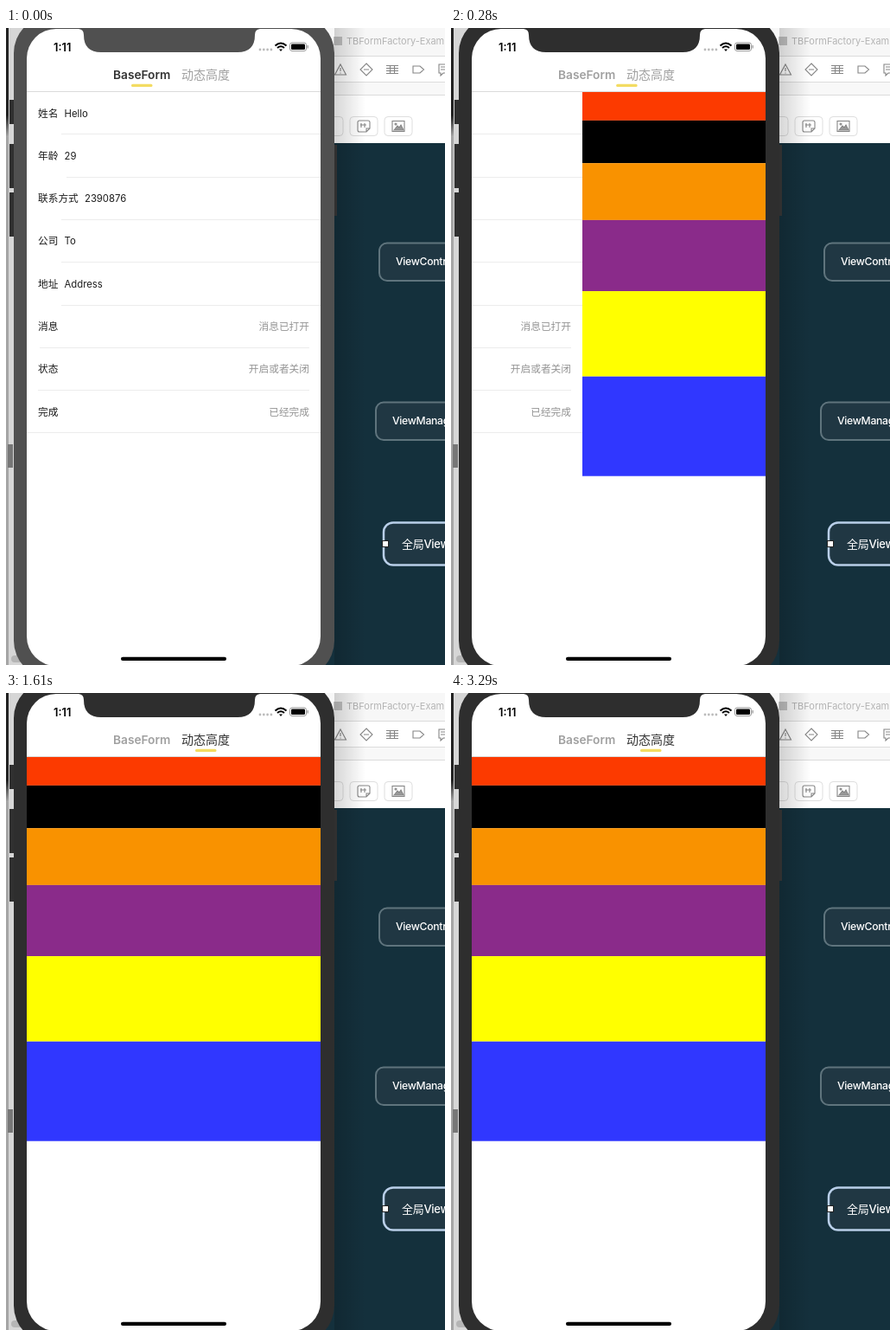
An HTML page that plays this animation: 508 px wide and 736 px high, repeating every 3.36 s.

```html
<!DOCTYPE html>
<html lang="zh">
<head>
<meta charset="utf-8">
<style>
html, body { margin: 0; width: 100%; height: 100%; overflow: hidden; background: #fff; }
svg { display: block; width: 508px; height: 736px; }
text { font-family: Inter, "Noto Sans CJK SC", "Noto Sans CJK", sans-serif; }
.row { font-size: 11.7px; fill: #1c1c1c; }
.value { font-size: 11.3px; }
.status { fill: #949494; text-anchor: end; }
.tab { font-size: 13.7px; font-weight: 600; }
.cjk { font-size: 14px; font-weight: 500; }
.node text { font-size: 12.2px; font-weight: 500; letter-spacing: -.3px; fill: #fff; }
.node rect { fill: #203743; stroke: #5f747d; stroke-width: 2; }
.icon { fill: none; stroke: #858585; stroke-width: 1.1; }
.button { fill: #fff; stroke: #dedede; }
</style>
</head>
<body>
<svg viewBox="0 0 508 736">
  <defs>
    <clipPath id="view"><rect x="24" y="74" width="340" height="640"/></clipPath>
    <linearGradient id="shade">
      <stop stop-opacity=".16"/><stop offset="1" stop-opacity="0"/>
    </linearGradient>
    <linearGradient id="edge" x2="0" y2="1">
      <stop stop-color="#222"/><stop offset=".8" stop-color="#222"/><stop offset="1" stop-color="#aaa"/>
    </linearGradient>
  </defs>

  <!-- editor window behind the phone -->
  <rect width="508" height="736" fill="#d6d6d6"/>
  <rect width="3" height="736" fill="#a5a5a5"/>
  <rect width="3" height="126" fill="url(#edge)"/>
  <rect x="2" y="481" width="6" height="27" fill="#777"/>
  <rect x="6" y="725" width="20" height="8" rx="4" fill="#b5b5b5"/>
  <rect x="340" width="168" height="133" fill="#fff"/>
  <rect x="340" width="168" height="32" fill="#f7f7f7"/>
  <rect x="340" y="63" width="168" height="15" fill="#f8f8f8"/>
  <path d="M340 32.5H508M340 62.5H508M340 77.5H508" stroke="#dcdcdc"/>
  <rect x="379" y="10" width="10" height="10" fill="#c2c2c2"/>
  <text x="394" y="19" font-size="11" fill="#b4b4b4">TBFormFactory-Example</text>
  <g class="icon">
    <path d="M387 42L393.500 54H380.500ZM387 46V50M387 51.500V52.500"/>
    <path d="M417 41L424 48L417 55L410 48ZM414 48H420"/>
    <path d="M440 43.500H454M440 46.500H454M440 49.500H454M440 52.500H454M444.500 43V53M449.500 43V53"/>
    <path d="M471 44H479L483.500 48L479 52H471Z"/>
    <path d="M501 42H512V52H506L503 55V52H501ZM503 45H508M503 48H508"/>
  </g>
  <rect class="button" x="358" y="102.500" width="32" height="22" rx="4"/>
  <rect class="button" x="398" y="102.500" width="32" height="22" rx="4"/>
  <rect class="button" x="438" y="102.500" width="32" height="22" rx="4"/>
  <g class="icon" stroke="#a0a0a0">
    <path d="M409 107H419Q421 107 421 109V116L417 120H409Q407 120 407 118V109Q407 107 409 107ZM411 110V115M415 110V115M410 112H417M417 120V116H421"/>
    <rect x="447" y="107.500" width="14" height="12"/>
    <path d="M449 118L453 113L455 115L457 112L460 118Z" fill="#999"/>
    <circle cx="451" cy="111" r="1"/>
  </g>
  <rect x="340" y="133" width="168" height="603" fill="#14303c"/>
  <g class="node">
    <rect x="432" y="248.500" width="120" height="43.500" rx="9"/>
    <text x="451" y="274">ViewController</text>
    <rect x="428" y="432.500" width="120" height="43.500" rx="9"/>
    <text x="447" y="458">ViewManager</text>
    <rect x="437" y="571.500" width="120" height="49" rx="11" style="stroke:#b9cfe9;stroke-width:2.500"/>
    <text x="458" y="601" style="font-size:13px">全局View</text>
  </g>
  <rect x="435.500" y="592.500" width="7" height="7" fill="#fff" stroke="#222"/>
  <rect x="380" width="36" height="736" fill="url(#shade)"/>

  <!-- phone -->
  <path d="M4 83h6v28h-6zM4 134h6v51h-6zM4 190h6v51h-6zM378 135h5v82h-5z" fill="#303030"/>
  <rect class="body" x="9" y="-14" width="371" height="765" rx="43"/>
  <rect x="24" y="1" width="340" height="736" rx="34" fill="#fff"/>
  <path class="body" d="M84 0V1Q90 1.500 90 8Q90 28 110 28H268Q288 28 288 8Q288 1.500 294 1V0Z"/>
  <text x="55" y="26.500" font-size="12.800" font-weight="600">1:11</text>
  <g fill="#bbb">
    <circle cx="294" cy="25" r="1.400"/><circle cx="298.300" cy="25" r="1.400"/>
    <circle cx="302.600" cy="25" r="1.400"/><circle cx="306.900" cy="25" r="1.400"/>
  </g>
  <g fill="none" stroke="#000" stroke-width="2">
    <path d="M311.500 20.500Q318 14.500 324.500 20.500M314 23Q318 19.500 322 23"/>
    <path d="M316 24.500H320L318 27Z" fill="#000" stroke="none"/>
  </g>
  <rect x="328.500" y="17" width="19" height="9.500" rx="2.500" fill="none" stroke="#999"/>
  <rect x="330" y="18.500" width="16" height="6.500" rx="1.300"/>
  <rect x="348.500" y="20" width="1.300" height="3.500" fill="#999"/>

  <text id="first" class="tab" x="124" y="59">BaseForm</text>
  <text id="second" class="tab cjk" x="203" y="59">动态高度</text>
  <rect id="bar" x="145" y="64.700" width="24.500" height="3.300" rx="1.600" fill="#f3dc62"/>
  <path d="M24 73.500H364" stroke="#dadada"/>
  <g clip-path="url(#view)"><g id="pages"></g></g>
  <rect x="133" y="726.700" width="122" height="4.300" rx="2.100"/>
</svg>
<script>
const $ = id => document.getElementById(id);
const SCALE = 0.8217, TOP = 74, WIDTH = 340, LOOP = 3360, STEP = 70;

// label, value, separator start, separator end
const rows = [
  ['姓名', 'Hello', 64, 364],
  ['年龄', '29', 70, 364],
  ['联系方式', '2390876', 64, 364],
  ['公司', 'To', 64, 364],
  ['地址', 'Address', 64, 364],
  ['消息', '消息已打开', 39, 351],
  ['状态', '开启或者关闭', 37, 351],
  ['完成', '已经完成', 24, 364]
];
const colors = ['#fc3a00', '#000', '#f99200', '#8a2b8a', '#ff0', '#3037ff'];

let markup = '';
rows.forEach(([label, value, from, to], i) => {
  const y = TOP + i * 60 * SCALE, base = y + 28.5;
  const isStatus = i > 4;
  const x = isStatus ? 351 : 44 + label.length * 11.75;
  markup += `<text class="row" x="37" y="${base}">${label}</text>
    <text class="row ${isStatus ? 'status' : 'value'}" x="${x}" y="${base}">${value}</text>
    <path d="M${from} ${Math.floor(y + 48.8) + 0.5}H${to}" stroke="#ececec"/>`;
});
let y = TOP;
colors.forEach((color, i) => {
  const h = (40 + 20 * i) * SCALE;
  markup += `<rect x="${24 + WIDTH}" y="${y}" width="${WIDTH}" height="${h}" fill="${color}"/>`;
  y += h;
});
$('pages').innerHTML = markup;

// A slow drag, then a flick that settles on the second page.
const swipe = [0, 0, 10, 50, 212, 335, WIDTH];

function draw(now) {
  const step = Math.floor(now % LOOP / STEP);
  const offset = swipe[Math.min(step, swipe.length - 1)];
  const tint = on => on ? '#333' : '#a0a0a0';
  $('pages').setAttribute('transform', `translate(${-offset})`);
  $('bar').setAttribute('transform', `translate(${74 * offset / WIDTH})`);
  $('first').setAttribute('fill', tint(offset === 0));
  $('second').setAttribute('fill', tint(offset === WIDTH));
  for (const part of document.querySelectorAll('.body'))
    part.setAttribute('fill', step ? '#2e2e2e' : '#505050');
}

const start = performance.now();
function tick() {
  draw(performance.now() - start);
  requestAnimationFrame(tick);
}
tick();
</script>
</body>
</html>
```
